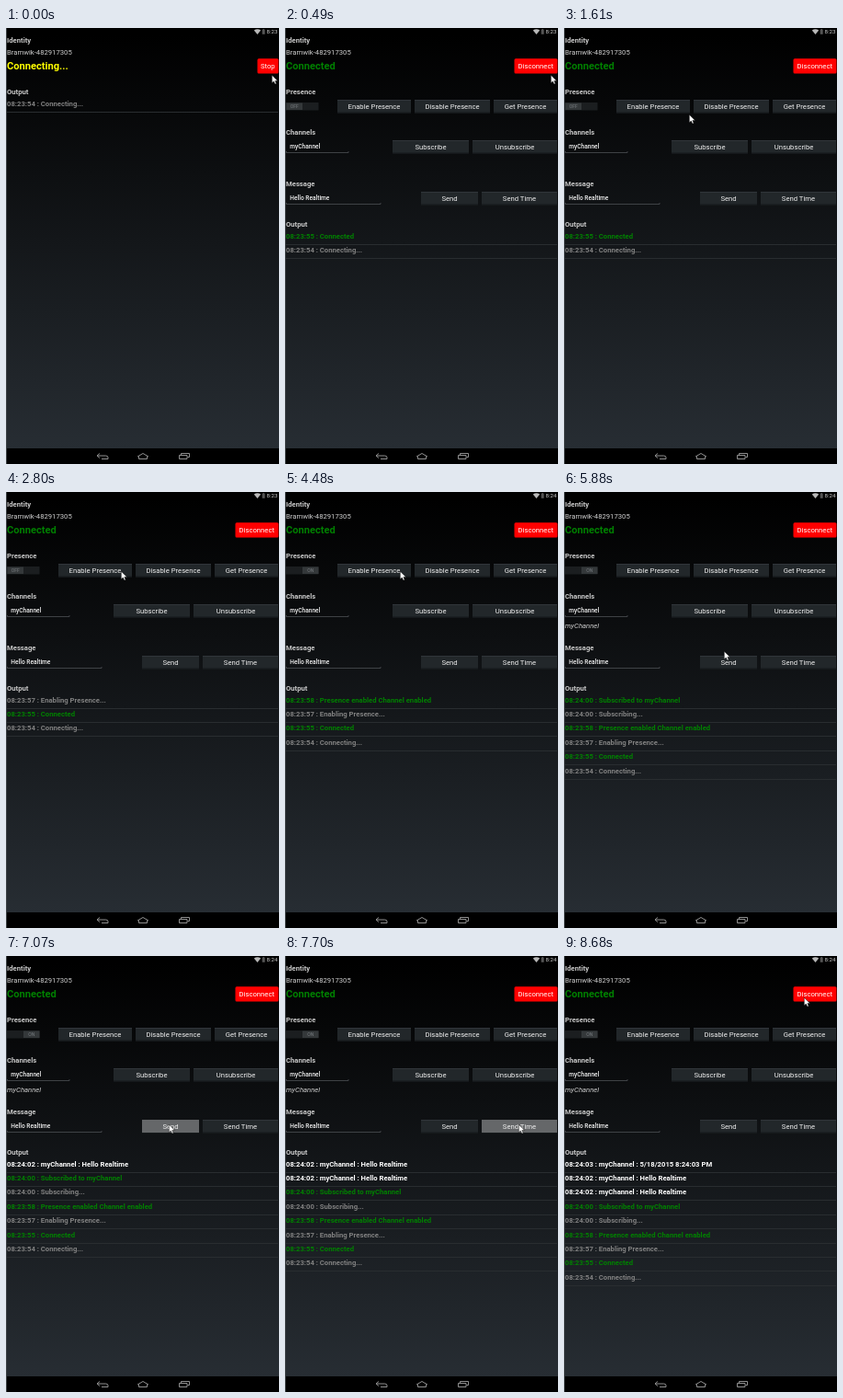
These frames come from a looping animation (297 px wide and 474 px high, 8.82 s). An HTML page:

```html
<!DOCTYPE html>
<html lang="en">
<head>
<meta charset="utf-8">
<style>
html, body { margin: 0; width: 100%; height: 100%; overflow: hidden; background: #000; }
svg { display: block; font-family: Roboto, "Noto Sans", sans-serif; }
</style>
</head>
<body>
<svg id="stage" width="297" height="474" viewBox="0 0 297 474"></svg>
<script>
const LOOP = 8820, STEP = 70, CONNECTED = 490, ENABLED = 3430, SUBSCRIBED = 5390;
const GREY = '#808080', GREEN = '#008000', WHITE = '#fff';
const BOLD = 'font-weight="700"', MID = 'text-anchor="middle"';

// Output log: arrival, text, colour
const log = [
  [0, '08:23:54 : Connecting...', GREY],
  [CONNECTED, '08:23:55 : Connected', GREEN],
  [2660, '08:23:57 : Enabling Presence...', GREY],
  [ENABLED, '08:23:58 : Presence enabled Channel enabled', GREEN],
  [5250, '08:24:00 : Subscribing...', GREY],
  [SUBSCRIBED, '08:24:00 : Subscribed to myChannel', GREEN],
  [6510, '08:24:02 : myChannel : Hello Realtime', WHITE],
  [7140, '08:24:02 : myChannel : Hello Realtime', WHITE],
  [7840, '08:24:03 : myChannel : 5/18/2015 8:24:03 PM', WHITE]
];

const presses = {
  'Enable Presence': [2520], 'Subscribe': [5180], 'Send': [6370, 7070], 'Send Time': [7700]
};

// Pointer glides: start, duration, destination, downward sag
const glides = [
  { at: 840, ms: 910, x: 132, y: 91, sag: 50 },
  { at: 1820, ms: 210, x: 150, y: 87 },
  { at: 2100, ms: 210, x: 125, y: 86 },
  { at: 4480, ms: 490, x: 163, y: 128 },
  { at: 5600, ms: 490, x: 177, y: 183 },
  { at: 7140, ms: 210, x: 254, y: 183 },
  { at: 7980, ms: 700, x: 261, y: 45 }
];

const clamp = v => Math.max(0, Math.min(1, v));
const easeOut = k => 1 - (1 - k) ** 2;

const rect = (x, y, w, h, fill, more = '') =>
  `<rect x="${x}" y="${y}" width="${w}" height="${h}" fill="${fill}" ${more}/>`;
const text = (x, y, str, fill, size = 7.7, more = '') =>
  `<text x="${x}" y="${y}" fill="${fill}" font-size="${size}" ${more}>${str}</text>`;
const line = (d, stroke, width) =>
  `<path d="${d}" fill="none" stroke="${stroke}" stroke-width="${width}"/>`;
const heading = (y, str) => text(1, y, str, '#c8c8c8', 7.7, BOLD);
const status = (str, fill) => text(1, 45, str, fill, 11.1, BOLD);

const backdrop =
  `<defs><linearGradient id="bg" x1="0" y1="0" x2="0" y2="1">
    <stop offset="0" stop-color="#000"/><stop offset="1" stop-color="#272d33"/>
  </linearGradient></defs>` +
  rect(0, 0, 297, 474, '#000') + rect(0, 8, 297, 449, 'url(#bg)') +
  rect(0, 0, 1, 474, '#3c4145') +
  '<path d="M269.8 2.6Q273.5 -.2 277.2 2.6L273.5 7z" fill="#b8b8b8"/>' +
  rect(278.7, 1.8, 3, 5, '#555') + rect(279.5, 1, 1.4, 1, '#555') +
  line('M102 462.5l-3 2.5l3 2.5M99.5 465H108.5q2.5 0 2.5 2v1.5H104' +
    'M143 466l6-3.5l6 3.5M144.5 465.5v3h9v-3' +
    'M188.5 464.5h8.5v4h-8.5zM190.5 464v-1.5h9v4h-2', '#a0a0a0', .9) +
  heading(16.4, 'Identity') + text(1, 28.5, 'Bramwik-482917305', '#d0d0d0');

function redButton(x, label) {
  return rect(x + .5, 33.2, 296 - x, 16.3, '#f00', 'rx="1.5"') +
    text((x + 296.5) / 2, 44.2, label, WHITE, 7.7, MID);
}

function button(x, y, w, label, t) {
  const glow = Math.max(0, ...(presses[label] || [])
    .map(p => t < p ? 0 : clamp((p + 210 - t) / 140)));
  return rect(x, y, w, 14.5, '#22272a') + rect(x, y, w, 1, '#30353a') +
    rect(x, y + 13.5, w, 1, '#15181a') +
    rect(x, y, w, 14, '#656769', `opacity="${glow}"`) +
    text(x + w / 2, y + 9.8, label, '#eee', 7.7, MID);
}

// Buttons packed against the right edge
function buttonRow(y, widths, t) {
  let x = 300;
  return Object.entries(widths).reverse()
    .map(([label, w]) => button(x -= w + 4, y, w, label, t)).join('');
}

function field(y, right, str) {
  return text(5.3, y - 4.8, str, '#f0f0f0', 6.6, 'font-weight="500"') +
    line(`M1.5 ${y - 2}v1.5H${right}v-1.5`, '#4c5054', .8);
}

function toggle(on) {
  const x = on ? 19 : 1.5;
  return rect(1, 81, 35.5, 8.5, '#1b1e20') + rect(x, 81.5, 17.5, 7.5, '#34383a') +
    text(x + 8.8, 87, on ? 'ON' : 'OFF', '#777c80', 5, MID);
}

function output(t, top) {
  const rows = log.filter(([at]) => at <= t).reverse();
  return heading(top, 'Output') + rows.map(([, str, fill], i) => {
    const y = top + 12.6 + i * 15.4;
    return text(1, y, str, fill, 7.7, BOLD) + rect(1, Math.round(y + 6), 295, 1, '#292d30');
  }).join('');
}

function panel(t) {
  return status('Connected', GREEN) + redButton(249, 'Disconnect') +
    heading(72.3, 'Presence') + toggle(t >= ENABLED) +
    buttonRow(78, { 'Enable Presence': 80, 'Disable Presence': 82, 'Get Presence': 69 }, t) +
    heading(116.1, 'Channels') + field(136, 69, 'myChannel') +
    buttonRow(122, { 'Subscribe': 83, 'Unsubscribe': 92 }, t) +
    (t >= SUBSCRIBED ? text(1, 147.5, 'myChannel', '#d0d0d0', 7.7, 'font-style="italic"') : '') +
    heading(172.3, 'Message') + field(192, 104, 'Hello Realtime') +
    buttonRow(178, { 'Send': 62, 'Send Time': 82 }, t) + output(t, 215.9);
}

function pointer(t) {
  let x = 289, y = 51;
  for (const g of glides) {
    const k = easeOut(clamp((t - g.at) / g.ms));
    x += (g.x - x) * k;
    y += (g.y - y) * k + (g.sag || 0) * Math.sin(Math.PI * k);
  }
  return `<path transform="translate(${Math.round(x)} ${Math.round(y)}) scale(1.1)"
    d="M.3 .2V8L2.1 6.4L3.4 9.2L4.7 8.6L3.5 5.9H6z" fill="#fff" stroke="#000" stroke-width=".4"/>`;
}

function scene(t) {
  const body = t < CONNECTED
    ? status('Connecting...', '#ff0') + redButton(273, 'Stop') + output(t, 72.4)
    : panel(t);
  return backdrop + text(283.5, 6.2, t < 4480 ? '8:23' : '8:24', '#ccc', 6.2) + body + pointer(t);
}

const stage = document.getElementById('stage');
let shown = -1;
function frame() {
  const t = Math.floor(performance.now() % LOOP / STEP) * STEP;
  if (t !== shown) stage.innerHTML = scene(shown = t);
  requestAnimationFrame(frame);
}
frame();
</script>
</body>
</html>
```
